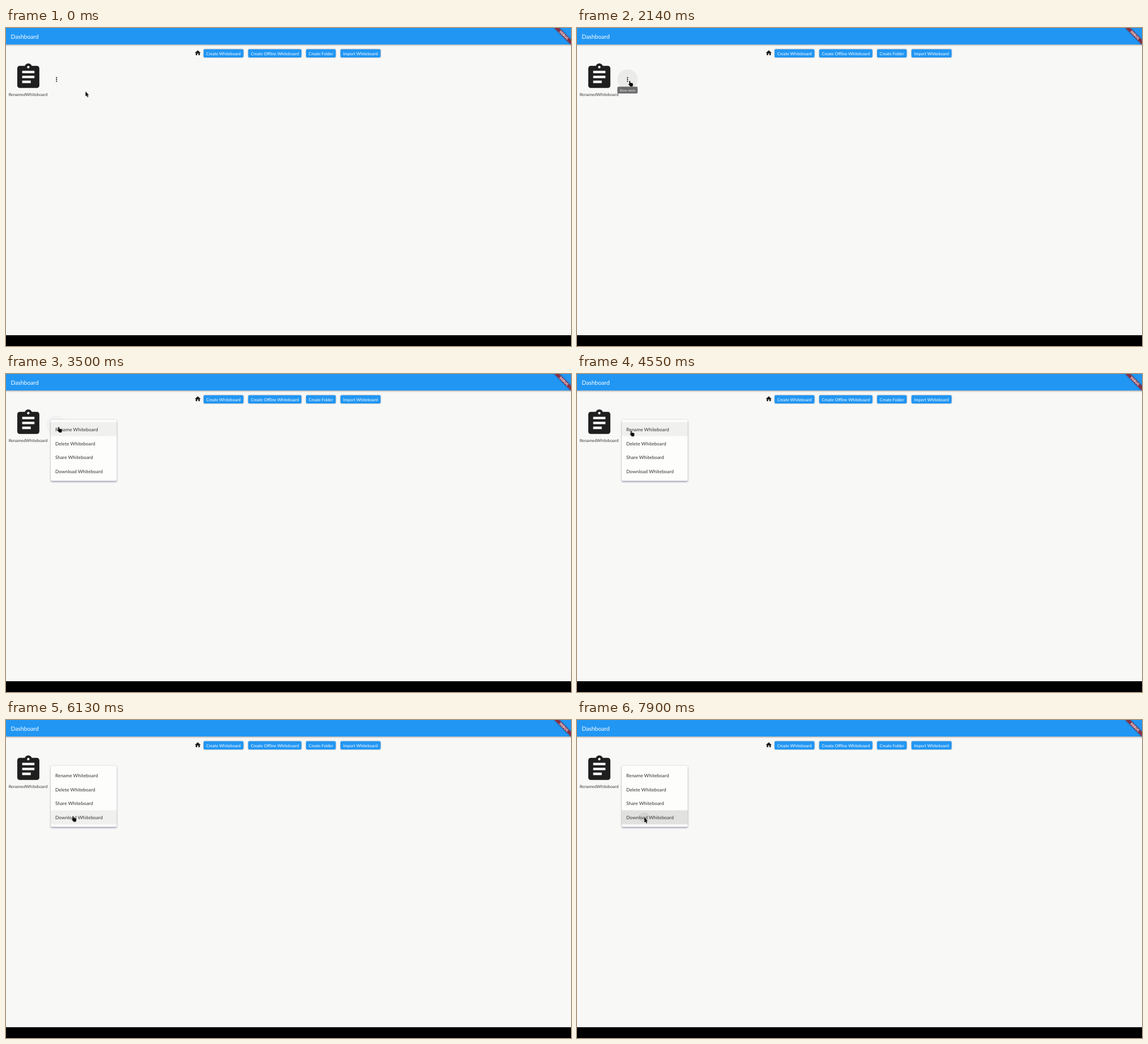
Animation, 998 px wide and 561 px high, one loop 8000 ms. Source, as an HTML page:

```html
<!DOCTYPE html>
<html lang="en">
<head>
<meta charset="utf-8">
<title>Dashboard</title>
<style>
  html, body { margin: 0; width: 100%; height: 100%; overflow: hidden; background: #f8f8f7; }
  svg { display: block; width: 100vw; height: 100vh; }
  text { font-family: Lato, "Open Sans", sans-serif; text-rendering: geometricPrecision; }

  .bar { fill: #2196f3; filter: drop-shadow(0 1px 1.5px rgba(0,0,0,.4)); }
  .title { font-size: 10.4px; fill: #fff; }
  .icon { fill: #1f1f1f; }
  .label { font-size: 7.28px; fill: #3a3a3a; letter-spacing: .06px; }
  .buttons rect { fill: #2196f3; filter: drop-shadow(0 .8px .8px rgba(0,0,0,.35)); }
  .buttons text { font-size: 7.28px; fill: #fff; text-anchor: middle; }
  .ribbon { fill: rgba(183,28,28,.7); filter: drop-shadow(0 0 1.5px rgba(0,0,0,.5)); }
  .debug { font-size: 5.4px; font-weight: 900; fill: #fff; text-anchor: middle; letter-spacing: .2px; }
  .menu { filter: drop-shadow(0 2.2px 1.2px rgba(70,60,110,.38)) drop-shadow(0 .5px 1.5px rgba(0,0,0,.16)); }
  .items text { font-size: 8.32px; fill: #333; letter-spacing: .04px; }
  .tip text { font-size: 5.2px; fill: #fff; letter-spacing: .12px; text-anchor: middle; }

  .hover, .press, .tip, .menu, .panel, .items text, .row, .held, .splash, .cursor, .arrow, .hand {
    animation: 8s linear infinite backwards;
  }

  /* one percent is 80 ms */
  .hover { animation-name: hover; }
  @keyframes hover { 0%, 20.5% { opacity: 0 } 22%, 42% { opacity: 1 } 44.5%, 100% { opacity: 0 } }
  .press { animation-name: press; }
  @keyframes press { 0%, 35.6% { opacity: 0 } 37.6%, 42% { opacity: 1 } 44.5%, 100% { opacity: 0 } }
  .tip { animation-name: tip; }
  @keyframes tip { 0%, 21% { opacity: 0 } 23%, 28.6% { opacity: 1 } 29.8%, 100% { opacity: 0 } }

  .menu { animation-name: menu; }
  @keyframes menu { 0%, 37.9% { opacity: 0 } 39.15%, 100% { opacity: 1 } }
  .panel { animation-name: panel; }
  @keyframes panel {
    0%, 37.9% { width: 0; height: 0 }
    38.6% { width: 116.6px; height: 27px }
    40.65%, 100% { width: 116.6px; height: 107.6px }
  }
  .items text { animation-name: item; }
  .items text:nth-child(2) { animation-delay: 54ms; }
  .items text:nth-child(3) { animation-delay: 109ms; }
  .items text:nth-child(4) { animation-delay: 163ms; }
  @keyframes item { 0%, 38.6% { opacity: 0 } 39.6%, 100% { opacity: 1 } }

  .row { fill: rgba(0,0,0,.05); }
  .rename { animation-name: rename; }
  @keyframes rename { 0%, 42% { opacity: 0 } 43.2%, 63.3% { opacity: 1 } 64.3%, 100% { opacity: 0 } }
  .delete { animation-name: delete; }
  @keyframes delete { 0%, 63.5% { opacity: 0 } 64.5%, 67.6% { opacity: 1 } 68.6%, 100% { opacity: 0 } }
  .share { animation-name: share; }
  @keyframes share { 0%, 67.6% { opacity: 0 } 68.6%, 73.3% { opacity: 1 } 74.4%, 100% { opacity: 0 } }
  .download { animation-name: download; }
  @keyframes download { 0%, 73.4% { opacity: 0 } 74.6%, 100% { opacity: 1 } }
  .held { animation-name: held; }
  @keyframes held { 0%, 97.25% { opacity: 0 } 100% { opacity: .1 } }
  .splash { animation-name: splash; }
  @keyframes splash { 0%, 97.25% { r: 0 } 100% { r: 17px } }

  .cursor { animation-name: move; }
  @keyframes move {
    0%, 6.88% { transform: translate(140.5px, 112px) }
    11.25% { transform: translate(118px, 116px) }
    15.9%, 17.1% { transform: translate(94px, 113px) }
    21.9% { transform: translate(92.8px, 98px) }
    26.7%, 51.9% { transform: translate(92px, 93px) }
    56.9% { transform: translate(94.5px, 99.8px) }
    60.9%, 62.1% { transform: translate(100px, 105px) }
    65% { transform: translate(107px, 120px) }
    67.4% { transform: translate(112.5px, 155.3px) }
    71.4%, 72.6% { transform: translate(115px, 158px) }
    76.6% { transform: translate(117.3px, 169.3px) }
    81.9%, 90.9% { transform: translate(118.5px, 171px) }
    98.7%, 100% { transform: translate(119px, 172px) }
  }
  .arrow, .hand { animation-timing-function: step-end; }
  .arrow { animation-name: arrow; }
  @keyframes arrow { 0% { opacity: 1 } 20.5% { opacity: 0 } 90.9%, 100% { opacity: 1 } }
  .hand { animation-name: hand; }
  @keyframes hand { 0% { opacity: 0 } 20.5% { opacity: 1 } 90.9%, 100% { opacity: 0 } }
</style>
</head>
<body>
<svg viewBox="0 0 998 561">
  <defs>
    <clipPath id="lastRow"><rect x="79" y="159.3" width="116.6" height="24.9"/></clipPath>
  </defs>
  <rect width="998" height="561" fill="#f8f8f7"/>
  <rect y="542" width="998" height="19"/>

  <rect class="bar" x="-5" y="-5" width="1008" height="34"/>
  <text class="title" x="8.4" y="18.7">Dashboard</text>

  <g transform="translate(998 0) rotate(45)">
    <rect class="ribbon" x="-20.8" y="14.6" width="41.6" height="6.24"/>
    <text class="debug" x="0" y="19.6">DEBUG</text>
  </g>

  <path class="icon" transform="translate(332.5 37.7) scale(.52)" d="M10 20v-6h4v6h5v-8h3L12 3 2 12h3v8z"/>
  <g class="buttons">
    <rect x="349" y="37.6" width="70.4" height="14.5" rx="2"/>
    <text x="384.2" y="47.7">Create Whiteboard</text>
    <rect x="427.8" y="37.6" width="94" height="14.5" rx="2"/>
    <text x="474.8" y="47.7">Create Offline Whiteboard</text>
    <rect x="530" y="37.6" width="52.4" height="14.5" rx="2"/>
    <text x="556.2" y="47.7">Create Folder</text>
    <rect x="590.8" y="37.6" width="70.8" height="14.5" rx="2"/>
    <text x="626.2" y="47.7">Import Whiteboard</text>
  </g>

  <path class="icon" transform="translate(13.4 60.3) scale(2.167)" d="M19 3h-4.18C14.4 1.84 13.3 1 12 1c-1.3 0-2.4.84-2.82 2H5c-1.1 0-2 .9-2 2v14c0 1.1.9 2 2 2h14c1.1 0 2-.9 2-2V5c0-1.1-.9-2-2-2zm-7 0c.55 0 1 .45 1 1s-.45 1-1 1-1-.45-1-1 .45-1 1-1zm2 14H7v-2h7v2zm3-4H7v-2h10v2zm0-4H7V7h10v2z"/>
  <text class="label" x="4.7" y="119.5">RenamedWhiteboard</text>

  <circle class="hover" cx="89.3" cy="90.8" r="18" fill="rgba(0,0,0,.05)"/>
  <circle class="press" cx="89.3" cy="90.8" r="18" fill="rgba(40,40,70,.05)"/>
  <g class="icon">
    <circle cx="89.3" cy="87.7" r="1.1"/>
    <circle cx="89.3" cy="90.9" r="1.1"/>
    <circle cx="89.3" cy="94.1" r="1.1"/>
  </g>

  <g class="tip">
    <rect x="71.3" y="103.4" width="35.8" height="12.2" rx="2" fill="#616161" opacity=".92"/>
    <text x="89.3" y="111.5">Show menu</text>
  </g>

  <g class="menu">
    <rect class="panel" x="79" y="81" height="107.6" rx="2" fill="#fdfdfc"/>
    <rect class="row rename" x="79" y="84.6" width="116.6" height="24.9"/>
    <rect class="row delete" x="79" y="109.5" width="116.6" height="24.9"/>
    <rect class="row share" x="79" y="134.4" width="116.6" height="24.9"/>
    <rect class="row download" x="79" y="159.3" width="116.6" height="24.9"/>
    <g clip-path="url(#lastRow)">
      <rect class="held" x="79" y="159.3" width="116.6" height="24.9"/>
      <circle class="splash" cx="119" cy="172" r="0" fill="rgba(0,0,0,.06)"/>
    </g>
    <g class="items">
      <text x="87" y="100.6">Rename Whiteboard</text>
      <text x="87" y="125.5">Delete Whiteboard</text>
      <text x="87" y="150.4">Share Whiteboard</text>
      <text x="87" y="175.3">Download Whiteboard</text>
    </g>
  </g>

  <g class="cursor" fill="#0a0a0a">
    <path class="arrow" d="M0 0V8.6L2 7 3.4 10.2 4.9 9.5 3.5 6.4H6z"/>
    <path class="hand" d="M.3.9Q1.2-.5 2.1.9V3.6L5.6 4.3Q6.8 4.6 6.8 5.8V7.6Q6.8 8.8 6 10.2H2.2L-.9 6.6Q-1.2 5.5 0 5.6L.3 5.9z"/>
  </g>
</svg>
</body>
</html>
```
